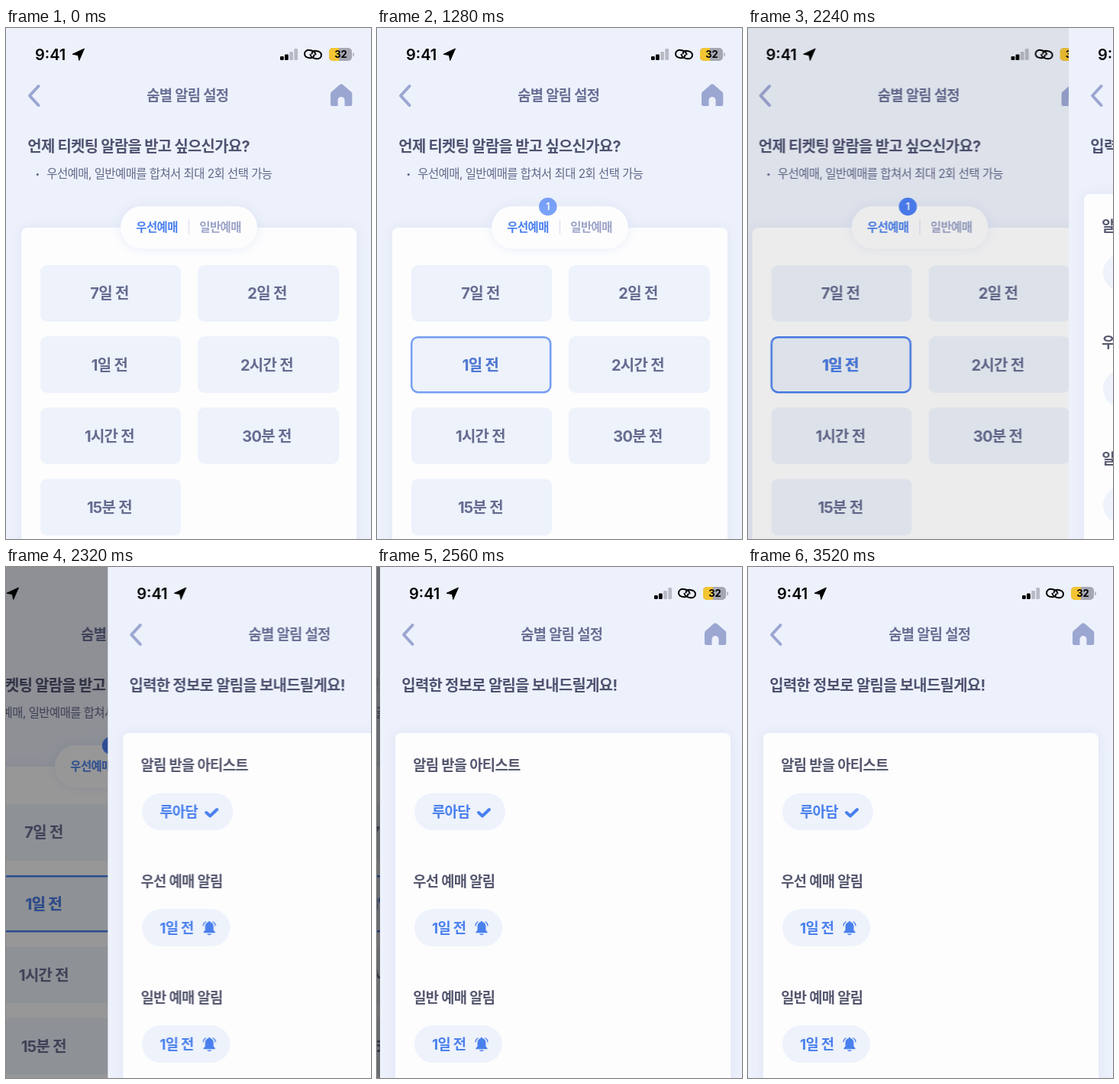
Write an HTML page that moves like this. It is 478 px wide and 668 px high and loops after 3.6 s.

```html
<!DOCTYPE html>
<html lang="ko">
<head>
<meta charset="utf-8">
<title>알림 설정</title>
<style>
  html, body { margin: 0; width: 100%; height: 100%; overflow: hidden; background: #edf1fb; }
  svg { display: block; width: 478px; height: 668px; }
  text {
    font: 700 18.8px Inter, "Noto Sans CJK KR", "Noto Sans CJK", sans-serif;
    letter-spacing: -.035em;
    white-space: pre;
  }
  .bg { fill: #edf1fb; }
  .panel { fill: #fdfdfe; filter: drop-shadow(0 0 7px #c9d1ee66); }
  .soft { fill: #edf2fb; }
  .title { fill: #6a7095; }
  .head { font-size: 19.9px; fill: #4f5270; }
  .note { font-size: 15.45px; font-weight: 400; fill: #63688a; }
  .tab { font-size: 15.5px; fill: #9ba3c8; }
  .opt text { font-size: 20px; fill: #666c90; text-anchor: middle; }
  .label { fill: #55586f; }
  .blue, .opt .blue, .tab.blue { fill: #4a80ee; }
  .icon { fill: #9ba6d1; }
  .time { font-size: 20px; font-weight: 600; letter-spacing: 0; }
  .small { font-size: 13px; letter-spacing: 0; text-anchor: middle; }

  .first, .second, .dim, .pick { animation: 3600ms linear infinite; }
  .first { animation-name: recede; }
  .second { animation-name: enter; }
  .dim { animation-name: dim; }
  .pick { animation-name: pick; }

  @keyframes pick {
    0%, 25.6% { opacity: 0; }
    39.2%, 100% { opacity: 1; }
  }
  @keyframes enter {
    0% { transform: translateX(478px); }
    61.61% { transform: translateX(478px); animation-timing-function: cubic-bezier(.32, .72, 0, 1); }
    74.47%, 100% { transform: translateX(0); }
  }
  @keyframes recede {
    0% { transform: translateX(0); }
    61.61% { transform: translateX(0); animation-timing-function: cubic-bezier(.32, .72, 0, 1); }
    74.47%, 100% { transform: translateX(-119.5px); }
  }
  @keyframes dim {
    0% { opacity: 0; }
    61.61% { opacity: 0; animation-timing-function: cubic-bezier(.32, .72, 0, 1); }
    74.47%, 100% { opacity: .56; }
  }
</style>
</head>
<body>
<svg viewBox="0 0 478 668">
  <defs>
    <g id="header">
      <text class="time" x="38" y="41.8">9:41</text>
      <path d="M102.5 27 87 34.3 94.4 35.6 95.8 42.4Z" stroke="#000" stroke-linejoin="round"/>
      <rect x="359" y="37" width="4.8" height="5" rx="1.2"/>
      <rect x="365" y="34.5" width="4.8" height="7.5" rx="1.2"/>
      <g fill="#b8bbc6">
        <rect x="371.2" y="31" width="4.8" height="11" rx="1.2"/>
        <rect x="377.3" y="27" width="4.8" height="15" rx="1.2"/>
      </g>
      <g fill="none" stroke="#000" stroke-width="2" stroke-linecap="round">
        <path d="M403.5 35.5C403 38 400.5 39.5 398 39.3 394 39 391 37 391 33.8 391 30.5 394 28.6 397.5 28.9 401.5 29.2 405 31.5 405.5 34.5"/>
        <path d="M400.5 33.5C401 31 403.5 29.7 406 29.9 410 30.2 413 32.3 413 35.4 413 38.7 410 40.6 406.5 40.3 402.5 40 399 37.7 398.5 34.7"/>
      </g>
      <rect x="423" y="26" width="30" height="17" rx="5" fill="#a5a8b3"/>
      <path d="M436 26V43H428a5 5 0 0 1-5-5V31a5 5 0 0 1 5-5Z" fill="#f3c433"/>
      <path d="M454.3 32v5.5q1.7-.6 1.7-2.75t-1.7-2.75Z" fill="#a5a8b3"/>
      <text class="small" x="438.5" y="39.3">32</text>
      <path d="M42.5 76 31 88.5 42.5 101" fill="none" stroke="#9ba6d1" stroke-width="4" stroke-linecap="round" stroke-linejoin="round"/>
      <text class="title" x="184.2" y="95.4">숨별 알림 설정</text>
      <path class="icon" d="M437 74q2-1.5 4 0l11 9.5q1.3 1.2 1.3 3V99.5q0 2.5-2.5 2.5H443.5V94.5a4.5 4.5 0 0 0-9 0V102H427.5q-2.5 0-2.5-2.5V86.5q0-1.8 1.3-3Z"/>
    </g>
    <rect id="left" class="soft" x="45" width="184" height="74" rx="9"/>
    <rect id="right" class="soft" x="251" width="185" height="74" rx="9"/>
    <g id="alarm">
      <rect class="soft" x="45" width="115" height="48.5" rx="24.25"/>
      <text class="blue" x="68" y="31.8">1일 전</text>
      <g class="blue">
        <path d="M133 15.5q1.3 0 1.5 1.5 4 1 4 6v4.5l2 2.3q.7 1.2-.7 1.2H126.2q-1.4 0-.7-1.2l2-2.3V23q0-5 4-6 .2-1.5 1.5-1.5Z"/>
        <path d="M130 32.2h6q-.7 1.8-3 1.8t-3-1.8Z"/>
        <path d="M128 16.5q-2.7 1.8-3 5M138 16.5q2.7 1.8 3 5" fill="none" stroke="#4a80ee" stroke-width="1.3" stroke-linecap="round"/>
      </g>
    </g>
  </defs>

  <g class="first">
    <rect class="bg" width="478" height="668"/>
    <use href="#header"/>
    <text class="head" x="28.3" y="162.4">언제 티켓팅 알람을 받고 싶으신가요?</text>
    <circle cx="41.3" cy="191.5" r="1.6" fill="#63688a"/>
    <text class="note" x="53.3" y="196.2">우선예매, 일반예매를 합쳐서 최대 2회 선택 가능</text>

    <rect class="panel" x="20" y="261" width="439" height="440" rx="8"/>
    <rect class="panel" x="150" y="233" width="179" height="55.5" rx="27.75"/>
    <text class="tab blue" x="170.2" y="265.8">우선예매</text>
    <path d="M239.5 250v20" stroke="#d8def2"/>
    <text class="tab" x="253.2" y="265.8">일반예매</text>

    <g class="opt">
      <use href="#left" y="310"/><text x="135.5" y="354.4">7일 전</text>
      <use href="#right" y="310"/><text x="342" y="354.4">2일 전</text>
      <use href="#left" y="403"/><text x="135.5" y="447.6">1일 전</text>
      <use href="#right" y="403"/><text x="341.5" y="447.6">2시간 전</text>
      <use href="#left" y="496"/><text x="135.5" y="540.8">1시간 전</text>
      <use href="#right" y="496"/><text x="341.5" y="540.8">30분 전</text>
      <use href="#left" y="589.5"/><text x="135.5" y="634">15분 전</text>
      <g class="pick">
        <rect x="45.2" y="404.2" width="182" height="72" rx="8.5" fill="none" stroke="#4a80ee" stroke-width="2.5"/>
        <text class="blue" x="135.5" y="447.6">1일 전</text>
      </g>
    </g>
    <g class="pick">
      <circle cx="223.8" cy="233.5" r="11.8" fill="#4d82f8"/>
      <text class="small" x="223.8" y="238.3" style="fill:#fff;font-weight:600">1</text>
    </g>
  </g>

  <rect class="dim" width="478" height="668"/>

  <g class="second">
    <rect class="bg" width="478" height="668"/>
    <use href="#header"/>
    <text class="head" x="28.3" y="162.4">입력한 정보로 알림을 보내드릴게요!</text>
    <rect class="panel" x="20" y="217" width="439" height="480" rx="8"/>

    <text class="label" x="43.2" y="266">알림 받을 아티스트</text>
    <rect class="soft" x="45" y="295.5" width="119" height="48.5" rx="24.25"/>
    <text class="blue" x="68" y="327.3">루아담</text>
    <path d="M129 321l5 4.5 9-8.5" fill="none" stroke="#4a80ee" stroke-width="4" stroke-linecap="round" stroke-linejoin="round"/>

    <text class="label" x="43.2" y="418">우선 예매 알림</text>
    <use href="#alarm" y="447.3"/>
    <text class="label" x="43.2" y="570">일반 예매 알림</text>
    <use href="#alarm" y="599.3"/>
  </g>
</svg>
</body>
</html>
```
